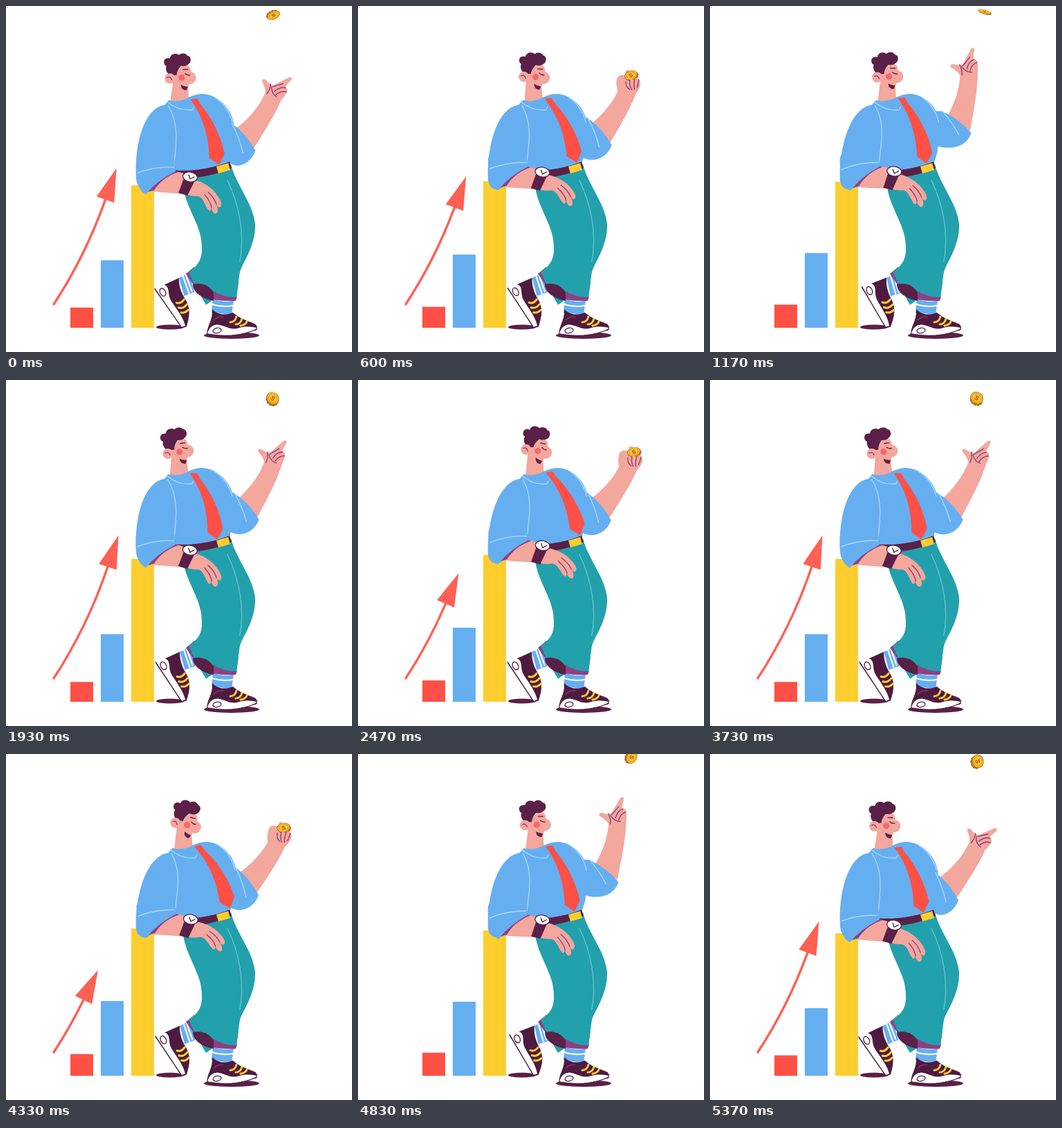
These frames come from a looping animation (500 px wide and 500 px high, 5.41 s). An HTML page:

```html
<!DOCTYPE html>
<html lang="en">
<head>
<meta charset="utf-8">
<title>Growth</title>
<style>
html, body { margin: 0; width: 100%; height: 100%; overflow: hidden; background: #fff; }
svg { display: block; width: 100vw; height: 100vh; }
.plum { fill: #5a2047; } .dark { fill: #4d1b40; } .purple { fill: #8f3f86; }
.skin { fill: #f3a79d; } .blue { fill: #65aff1; } .teal { fill: #22a0ac; }
.red { fill: #ff5046; } .yellow { fill: #ffcd2e; } .white { fill: #fff; }
.line { fill: none; stroke-width: 1.3; stroke-linecap: round; stroke-linejoin: round; }
.seam { stroke: #a9d8ff; } .crease { stroke: #8a3a78; } .ink { stroke: #4d1b40; }
.lace { stroke: #ffcd2e; stroke-width: 3; }
.stripe { stroke: #fff; stroke-width: 2.2; }
text { font: bold 11px "Liberation Sans", sans-serif; text-anchor: middle; fill: #a8621b; }
</style>
</head>
<body>
<svg viewBox="0 0 500 500">
  <defs>
    <g id="coinShape">
      <ellipse cx="1" cy="3" rx="9.5" ry="9" fill="#c77b1c"/>
      <ellipse cx="1" cy="3" rx="9" ry="8.5" fill="none" stroke="#80451d" stroke-width="1.4" stroke-dasharray="2 3"/>
      <ellipse rx="9.3" ry="9" fill="#ffc62f" stroke="#b4701d"/>
      <ellipse rx="6.8" ry="6.5" fill="none" stroke="#d6911f"/>
      <text y="4">$</text>
    </g>
  </defs>

  <rect id="barRed" class="red" x="93" width="33"/>
  <rect id="barBlue" class="blue" x="137" width="33"/>
  <rect id="barYellow" class="yellow" x="181" width="33"/>
  <g id="arrow">
    <path id="shaft" fill="none" stroke="#ff6054" stroke-width="3.4" stroke-linecap="round"/>
    <path id="tip" fill="#ff6054"/>
  </g>

  <ellipse class="plum" cx="237" cy="464" rx="20" ry="3.6"/>
  <ellipse class="plum" cx="326" cy="476" rx="40" ry="5"/>

  <g id="backFoot">
    <path class="skin" d="M256 392 L268 382 L274 396 L262 402Z"/>
    <path class="blue" d="M249 393 L263 386 L272 413 L257 419Z"/>
    <path class="line stripe" d="M255 391 L264 415 M259 389 L268 412"/>
    <path class="dark" d="M214 410 L249 393 C249 405 253 415 259 424 C266 436 266 446 261 463 L254 465Z"/>
    <path class="white" d="M215 410 C219 404 226 401 231 405 C236 409 233 418 238 426 C245 437 256 449 259 462 L254 464Z"/>
    <path class="line ink" d="M214.500 409 L254 465 L260 463"/>
    <ellipse cx="226" cy="414" rx="4" ry="6" transform="rotate(-28 226 414)" class="line ink"/>
    <path class="line lace" d="M246 429 Q252 431 257 424 M249 436 Q256 438 261 431 M253 443 Q259 444 263 439"/>
  </g>

  <g>
    <path class="skin" d="M300 414 H331 L329 424 H300Z"/>
    <path class="blue" d="M299 423 Q314 429 329 426 L326 446 L297 443Z"/>
    <path class="line stripe" d="M298 431 Q312 436 328 433"/>
    <path class="dark" d="M298 438 C306 447 318 447 328 443 C336 451 349 455 359 459 C364 462 364 467 361 469 L290 474 C291 461 299 454 298 438Z"/>
    <path class="white" d="M291 474 C293 464 300 459 309 461 C318 463 324 468 334 466 C345 462 353 463 362 465 Q362 468 355 470 C335 477 312 478 291 474Z"/>
    <path class="line ink" d="M291 474 C312 478 335 477 355 470 L362 467"/>
    <ellipse cx="305" cy="469" rx="6" ry="3.600" transform="rotate(-12 305 469)" class="line ink"/>
    <path class="line lace" d="M324 457 Q331 457 333 449 M332 460 Q339 460 341 452 M339 462 Q346 461 348 456"/>
    <path class="line crease" d="M300 454 Q306 448 314 449"/>
  </g>

  <path class="purple" d="M260 387 L272 377 L282 403 L271 403Z"/>
  <path class="teal" d="M256 262 C262 297 284 318 283 351 C283 368 277 375 264 384 L273 404 L289 432 L300 424 L300 416 C312 422 324 424 333 423 C334 411 336 398 338 384 C342 371 361 346 360 316 C358 286 333 260 325 229 L258 236Z"/>
  <path class="purple" d="M296 410 Q314 420 334 420 L332 426 Q316 427 299 424Z"/>
  <path class="teal" d="M300 400 H336 L333 421 Q314 421 298 411Z"/>
  <path class="plum" d="M270 402 C284 399 294 404 300 414 L300 426 C288 424 270 416 270 402Z"/>
  <path class="line" stroke="#63c7cf" d="M320 252 C338 289 345 333 338 369"/>

  <g id="forearm">
    <path class="skin" d="M328 181 C350 165 366 146 374 127 L401 127 C394 150 374 181 357 208Z"/>
    <g id="pointing">
      <path class="skin" d="M373 135 C377 125 374 116 371 110 C369 106 374 104 377 108 C380 112 383 114 387 115 L408 105 C413 102 416 106 412 109 L404 117 C408 121 407 126 403 130 C400 135 396 138 390 138Z"/>
      <path class="line crease" d="M384 117 C384 125 386 129 391 132 M386 117 L401 113 M388 124 Q396 117 404 119 M390 129 Q397 123 405 125 M383 113 Q382 121 377 127"/>
    </g>
    <g id="grip">
      <path class="skin" d="M372 135 C370 124 371 114 375 110 C379 107 383 109 386 109 L388 103 L392 103 L394 112 L404 118 C408 123 404 130 400 135 C397 139 392 141 388 139Z"/>
      <use href="#coinShape" transform="translate(394 111) rotate(-12) scale(1 .7)"/>
      <path class="skin" d="M385 121 Q387 115 390 119 Q394 114 397 119 Q401 114 404 118 C408 122 404 132 399 135 L390 135Z"/>
      <path class="line crease" d="M385 119 Q384 127 389 131 M391 118 Q389 126 392 132 M398 118 Q395 126 396 132 M404 119 Q402 126 400 130"/>
    </g>
  </g>
  <path id="upperArm" class="blue"/>

  <path id="neck" class="skin" d="M241 104 L262 108 L264 141 L237 139Z"/>
  <g id="head">
    <path class="skin" d="M241 100 L254 86 C262 84 266 88 266 95 C273 97 276 104 272 109 C269 113 266 113 264 113 L261 122 L241 124Z"/>
    <path class="plum" d="M229 86 C225 80 229 74 236 76 C237 69 245 68 249 71 C254 67 260 69 261 72 C267 72 268 82 262 85 C258 88 254 87 252 87 C249 91 246 94 246 100 L237 101 C231 97 229 91 231 87Z"/>
    <circle class="skin" cx="236" cy="105" r="7.500"/>
    <path class="line crease" d="M232 104 Q236 101 239 107"/>
    <circle cx="253" cy="104" r="4.600" fill="#f4686a"/>
    <path class="plum" d="M252 114 Q257 117 262 117 L260 122 C255 122 252 119 252 114Z"/>
    <path class="line ink" d="M255 92 L262 92 M258 98 Q262 101 265 100"/>
  </g>

  <g id="torso">
    <path class="blue" d="M235 136 C245 139 256 137 266 131 C275 127 284 126 291 128 C312 133 326 152 329 170 L327 212 L323 227 C300 235 262 240 244 239 L203 266 C192 264 188 258 188 245 C186 197 200 147 229 143Z"/>
    <path class="line seam" d="M232 138 C243 147 256 152 269 150 L271 146 M234 144 C250 169 246 198 243 230 M300 131 Q321 145 327 168"/>
  </g>
  <path id="armSeam" class="line seam"/>

  <path class="plum" d="M243 237 C262 240 300 235 323 225 L326 234 C306 243 278 250 250 249Z"/>
  <path class="yellow" d="M304 232 L321 227 L324 237 L307 242Z"/>

  <path id="tie" class="red" d="M266 135 L276 134 L281 143 C296 160 310 188 315 214 L307 230 L293 220 C292 187 284 164 272 144Z"/>

  <g id="restingArm">
    <path class="skin" d="M207 264 L243 239 C255 240 262 243 270 251 L260 272 C240 270 222 269 207 267Z"/>
    <path class="purple" d="M200 270 L240 236 L249 240 C233 245 222 254 214 266Z"/>
    <path class="blue" d="M188 226 L188 245 Q190 266 202 272 Q218 252 245 239 L243 219 L190 220Z"/>
    <path class="line seam" d="M190 241 C209 234 226 232 243 233"/>
    <g id="restingHand">
      <path class="skin" d="M266 249 C285 254 299 263 306 275 C311 282 313 289 309 291 C307 292 305 289 304 287 C307 295 306 300 303 300 C300 301 298 296 296 292 C296 297 293 297 291 293 C287 287 285 277 278 275 C271 275 265 274 260 272Z"/>
      <path class="line crease" d="M292 269 Q301 277 304 287 M287 273 Q296 283 297 292"/>
    </g>
    <path class="plum" d="M257 249 L272 254 L262 274 L249 270Z"/>
    <ellipse class="white" cx="266" cy="247" rx="10.500" ry="7" transform="rotate(10 266 247)" stroke="#5a2047" stroke-width="1.300"/>
    <path class="line ink" d="M264 244 L266 250 L272 247"/>
  </g>

  <g id="coin"><use href="#coinShape"/></g>
</svg>
<script>
const LOOP = 5410, CYCLE = LOOP / 3;
const CATCH = 550, THROW = 800, PEAK = 1467;
const $ = Object.fromEntries([...document.querySelectorAll('[id]')].map(el => [el.id, el]));
const set = (id, attrs) => { for (const k in attrs) $[id].setAttribute(k, attrs[k]); };
const move = (id, transform) => set(id, { transform });
const show = (id, on) => set(id, { visibility: on ? 'visible' : 'hidden' });

const clamp = u => Math.min(1, Math.max(0, u));
const smooth = u => (1 - Math.cos(Math.PI * clamp(u))) / 2;
const easeOut = u => 1 - (1 - clamp(u)) ** 2;
const wave = (t, crest) => Math.cos(2 * Math.PI * (t - crest) / CYCLE);
const radians = degrees => degrees * Math.PI / 180;

// Rises smoothly to 1 at the centre, once per cycle.
function bump(t, centre, reach) {
  const away = Math.abs(t - centre);
  return smooth(1 - Math.min(away, CYCLE - away) / reach);
}

function drawBars(t) {
  const tops = {
    barRed: 434 + 2.5 * wave(t, 230),
    barBlue: 361.4 + 6.1 * wave(t, 45),
    barYellow: 255.6 + 3.7 * wave(t, -60)
  };
  for (const id in tops) set(id, { y: tops[id], height: 465 - tops[id] });
  return tops.barYellow;
}

function drawArrow(t) {
  const u = t > 1200 ? easeOut((t - 1400) / 530)
    : easeOut((t + CYCLE - 1400) / 530) * (1 - smooth((t - 500) / 445));
  show('arrow', u > .005);
  const [ax, ay] = [69, 431], [bx, by] = [117, 358], [cx, cy] = [147, 270];
  const mx = ax + (bx - ax) * u, my = ay + (by - ay) * u;
  const ex = mx + (bx + (cx - bx) * u - mx) * u, ey = my + (by + (cy - by) * u - my) * u;
  const dx = ex - mx, dy = ey - my, length = Math.hypot(dx, dy) || 1;
  const size = Math.min(1, u * 4), fx = dx / length * size, fy = dy / length * size;
  set('shaft', { d: `M${ax} ${ay}Q${mx} ${my} ${ex} ${ey}` });
  set('tip', { d: `M${ex + fx * 48} ${ey + fy * 48}L${ex + fy * 13.5} ${ey - fx * 13.5}L${ex - fy * 13.5} ${ey + fx * 13.5}Z` });
}

function drawThrowingArm(x, y, turn, handTurn) {
  const angle = radians(52 + turn * .6);
  const hx = 25 * Math.cos(angle), hy = 25 * Math.sin(angle);
  const ax = x - hx - 3, ay = y - hy, bx = x + hx, by = y + hy;
  set('upperArm', { d: `M295 150L${ax} ${ay}Q${x + 3} ${y - 4} ${bx} ${by}C${bx - 6} ${by + 17} ${bx - 24} ${by + 27} 324 ${by + 18}L300 228Z` });
  set('armSeam', { d: `M${ax} ${ay}Q${x - 8} ${y} ${bx - 18} ${by + 3}` });
  move('forearm', `translate(${x} ${y}) rotate(${turn}) translate(-345 -190)`);
  for (const id of ['pointing', 'grip']) move(id, `rotate(${handTurn - turn} 385 132)`);
}

function drawCoin(t) {
  const held = t >= CATCH && t < THROW;
  show('grip', held);
  show('pointing', !held);
  show('coin', !held);
  const now = t < THROW ? t + CYCLE : t, end = CATCH + CYCLE;
  const progress = (now - THROW) / (end - THROW);
  const x = 384 + 22 * (1 - progress) ** 2;
  const y = 1 + 105 * (now < PEAK ? ((PEAK - now) / (PEAK - THROW)) ** 3.3
    : ((now - PEAK) / (end - PEAK)) ** 2.2);
  const turn = 155 + 1.93 * (now - CYCLE);
  const flat = .6 + .3 * Math.cos(radians(2.1 * (now - 1763)));
  move('coin', `translate(${x} ${y}) rotate(${turn}) scale(1 ${flat})`);
}

function draw(ms) {
  const t = ms % CYCLE;
  const wait = bump(t, 330, 480), crouch = bump(t, 790, 420), toss = bump(t, 1170, 380);
  const pose = (rest, w, c, s) => rest + w * wait + c * crouch + s * toss;

  const lean = pose(.7, -1.5, 5.7, 4.5);
  const headX = pose(1, -1, 1.5, 4.5), headY = pose(-.3, 0, -2.2, -1.7);
  const headTurn = pose(3.5, -15, 12.5, -3.5);
  const neckSkew = (headX + 15 * Math.sin(radians(headTurn)) - lean) / 22;

  const barTop = drawBars(t);
  drawArrow(t);
  drawThrowingArm(pose(342.5, 11, 7, 15.5), pose(193.5, -17.5, -8.6, -25.5),
    pose(2.5, -11, 0, -24.5), pose(7, -37, -3, -43));
  move('head', `translate(${headX} ${headY}) rotate(${headTurn} 252 130)`);
  move('neck', `matrix(1 0 ${-neckSkew} 1 ${lean + neckSkew * 137} 0)`);
  move('torso', `matrix(1 0 ${-lean / 110} 1 ${lean * 240 / 110} 0)`);
  move('tie', `translate(${lean} ${-lean * .35}) rotate(${pose(-1, 3, -6.5, .5)} 271 135)`);
  move('restingArm', `translate(${lean * .2} ${barTop - 259}) rotate(${pose(0, -.8, -1, -2.5)} 195 262)`);
  move('restingHand', `rotate(${-9 * crouch} 264 260)`);
  move('backFoot', `rotate(${pose(0, 3, 1.5, 5)} 257 463)`);
  drawCoin(t);
}

const start = performance.now();
function tick() {
  draw((performance.now() - start) % LOOP);
  requestAnimationFrame(tick);
}
tick();
</script>
</body>
</html>
```
